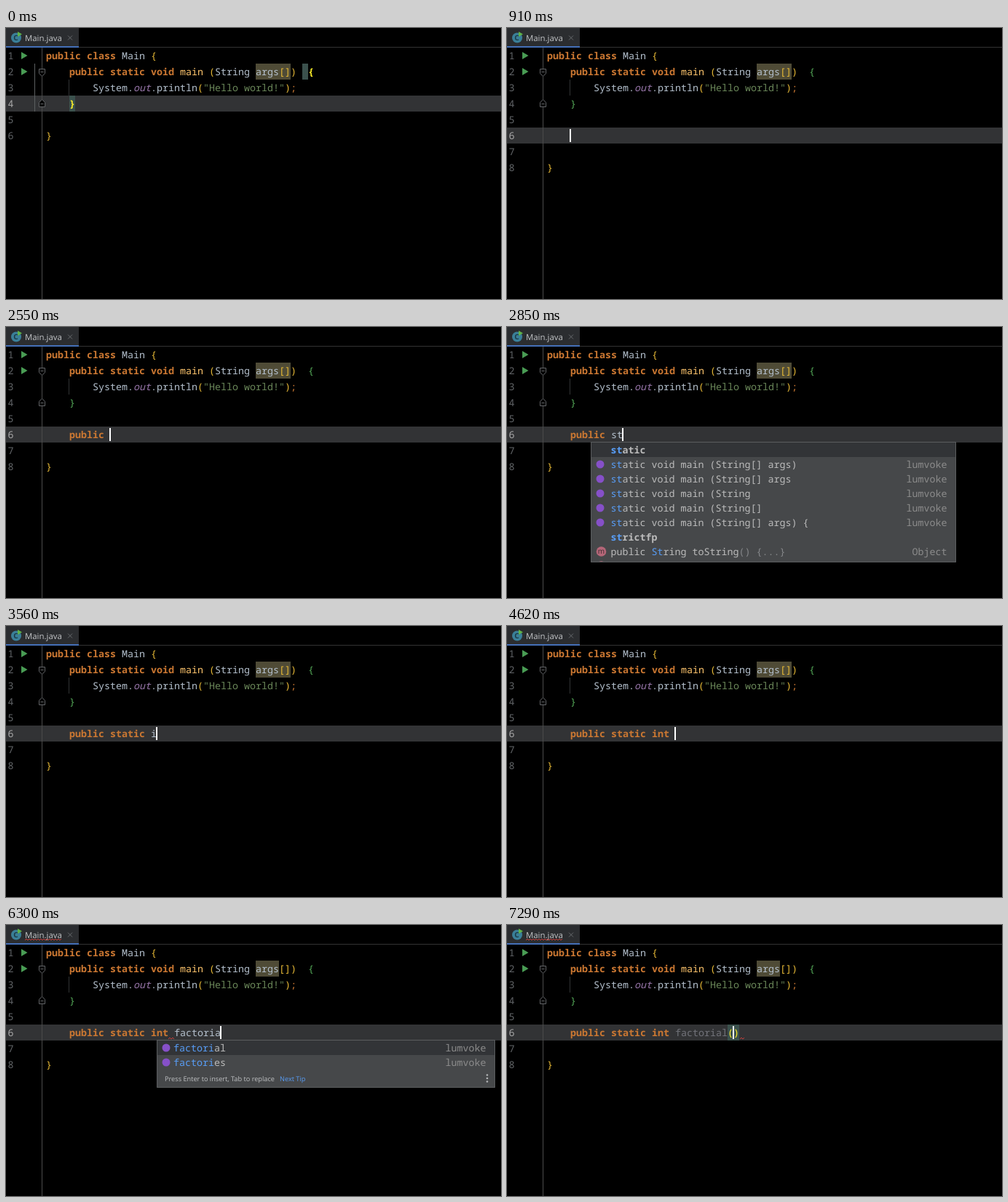
An HTML page that plays this animation: 680x373 px, repeating every 8000 ms.

```html
<!DOCTYPE html>
<html lang="en">
<head>
<meta charset="utf-8">
<title>Typing in a code editor</title>
<style>
html, body { margin: 0; width: 100%; height: 100%; overflow: hidden; background: #000; }
svg { display: block; width: 680px; height: 373px; }
text { white-space: pre; text-rendering: geometricPrecision; font: 13.333px "Noto Sans Mono", "DejaVu Sans Mono", monospace; }
.b { font-weight: 700; }
.i { font-style: italic; }
.ui { font-family: "Open Sans", "Noto Sans", sans-serif; }
.tab { font-size: 11.4px; }
.tip { font-size: 9.2px; }
.mini { font-size: 10px; }
</style>
</head>
<body>
<svg id="stage" viewBox="0 0 680 373"></svg>
<script>
const LOOP = 8000, LEFT = 55, CH = 8, ROW = 22;
const C = {
  key: '#cc7832', id: '#b4c0cd', fn: '#ffc66d', str: '#6a8759', field: '#9876aa',
  gold: '#e8ba36', green: '#54a857', match: '#ffef28', matchBg: '#3b514d',
  line: '#323335', dim: '#72737a', blue: '#589df6', red: '#c8403c'
};
const KEYWORDS = ['public', 'static', 'int'];

// [time, text on the new line]
const KEYS = [
  [910, ''], [1680, 'p'], [1800, 'pu'], [1950, 'pub'], [2090, 'publ'], [2250, 'publi'], [2390, 'public'],
  [2520, 'public '], [2640, 'public s'], [2780, 'public st'], [2920, 'public sta'], [3020, 'public stat'],
  [3130, 'public stati'], [3220, 'public static'], [3360, 'public static '], [3560, 'public static i'],
  [3700, 'public static in'], [3840, 'public static int'], [4620, 'public static int '],
  [5090, 'public static int f'], [5400, 'public static int fa'], [5600, 'public static int fac'],
  [5830, 'public static int fact'], [5940, 'public static int facto'], [6050, 'public static int factor'],
  [6170, 'public static int factori'], [6290, 'public static int factoria'],
  [6400, 'public static int factorial'], [7290, 'public static int factorial()']
];

// Suggestion rows: icon|text|tail|right label ('t' assistant, 'm' method)
const ai = s => `t|${s}||lumvoke`;
const mainAi = (lead, ends) => ends.map(e => ai(lead + 'static void main' + e));
const toStr = 'm|public String toString|() {...}|Object';
const equalsRow = 'm|public boolean equals|(Object obj) {...}|Object';
const hashRow = 'm|public int hashCode|() {...}|Object';
const cloneRow = 'm|protected Object clone|() {...}|Object';
const pubRows = ['|public', ...mainAi('public ', [' (String', '', ' (String[] args)', ' (String[] args', ' (String[] args) {']),
  equalsRow, hashRow, toStr];
const stTail = [' (String[] args)', ' (String[] args', ' (String', ' (String[]', ' (String[] args) {'];
const staticRows = ['|static', ...mainAi('', stTail)];
const stRows = [...staticRows, '|strictfp', toStr, cloneRow];
const intRows = ['|int', '|interface', ai('int main'), ai('int i'), ai('int[] args'), hashRow, 'm|protected void finalize|() {...}|Object'];
const facRows = [ai('factory'), ai('interface')];
const fRows = [...facRows, ai('false'), ai('fast'), ai('face')];
const factRows = ['factory', 'factor', 'factorial', 'factories', 'facts'].map(ai);

// [time, query, rows, left, right, text x, fixed bottom]
const pub = (t, q, rows = pubRows) => [t, q, rows, 59, 525, 86.5];
const stat = (t, q, rows, bottom) => [t, q, rows, 115, 617, 142.5, bottom];
const num = (t, q, rows) => [t, q, rows, 175, 640, 198.5];
const fac = (t, q, rows) => [t, q, rows, 207, 672, 230];
const POPUPS = [
  pub(1740, 'p', [...pubRows, '|private', '|protected']), pub(1850, 'pu'), pub(2000, 'pub'), pub(2130, 'publ'),
  pub(2290, 'publi'), pub(2430, 'public'), [2520],
  stat(2700, 's', [...stRows, '|synchronized', equalsRow]), stat(2820, 'st', stRows, 324),
  stat(2960, 'sta', staticRows), stat(3060, 'stat', staticRows), stat(3170, 'stati', staticRows),
  stat(3260, 'static', staticRows), [3360],
  num(3610, 'i', intRows), num(3740, 'in', intRows), num(3890, 'int', intRows), [4620],
  fac(5200, 'f', fRows), fac(5400, 'fa', fRows), fac(5630, 'fac', facRows),
  fac(5870, 'fact', factRows), fac(5980, 'facto', factRows.slice(0, 4)), fac(6090, 'factor', factRows.slice(0, 4)),
  fac(6210, 'factori', factRows.slice(2, 4)), fac(6330, 'factoria', factRows.slice(2, 3)), [6450]
];

const at = (list, t) => list.filter(e => e[0] <= t).pop();
const esc = s => String(s).replace(/&/g, '&amp;').replace(/</g, '&lt;');
const rowTop = n => 27 + (n - 1) * ROW;
const colX = c => LEFT + c * CH;
const rect = (x, y, w, h, fill) => `<rect x="${x}" y="${y}" width="${w}" height="${h}" fill="${fill}"/>`;
const path = (d, stroke, fill = 'none') => `<path d="${d}" stroke="${stroke}" fill="${fill}"/>`;
const circle = (x, y, r, fill) => `<circle cx="${x}" cy="${y}" r="${r}" fill="${fill}"/>`;
const text = (x, y, s, fill, cls = '', anchor = 'start') =>
  `<text x="${x}" y="${y}" fill="${fill}" class="${cls}" text-anchor="${anchor}">${esc(s)}</text>`;
const code = (row, col, s, fill, cls) => text(colX(col), rowTop(row) + 16, s, fill, cls);
const caret = (row, col) => rect(colX(col) - 1, rowTop(row) + 2, 2, 18, '#fff');

function wave(x1, x2, y) {
  let d = `M${x1} ${y + 2}`;
  for (let x = x1 + 2, up = true; x <= x2; x += 2, up = !up) d += `L${x} ${up ? y : y + 2}`;
  return path(d, C.red);
}

function tabBar(error) {
  return rect(0, 0, 100, 26, '#2b2d30') + rect(100, 26, 580, 1, '#323232') + rect(0, 25, 100, 2, '#4470b8') +
    circle(14, 13.5, 7, '#3a7f98') + text(13.5, 17, 'C', '#1c3a46', 'ui mini b', 'middle') +
    path('M16 5L22 8.5L16 12Z', 'none', '#5fb348') +
    text(26, 18, 'Main.java', '#c4c6c8', 'ui tab') +
    path('M85 10.5l6 6m0 -6l-6 6', '#66696c') + (error ? wave(26, 77, 19) : '');
}

function gutter(count, current, scope) {
  let s = path('M49.5 27V373', '#4b4b4b');
  for (let n = 1; n <= count; n++) s += text(2.5, rowTop(n) + 16, n, n === current ? '#a9a9a9' : '#606366');
  for (const y of [38, 60]) s += path(`M21 ${y - 5}L29.5 ${y}L21 ${y + 5}Z`, 'none', '#499c54');
  if (scope) s += path('M39.5 49V115', '#5c6061');
  return s + path('M45.5 56.5h8v6l-4 4l-4 -4zM47.5 60.5h4', '#626467', '#000') +
    path('M45.5 108.5h8v-6l-4 -4l-4 4zM47.5 104.5h4', '#626467', '#000');
}

function program(t, lastRow) {
  const paired = t < 570;
  let s = rect(343, 49, t < 5090 ? 48 : 32, 22, '#4f4b36') + path('M86.5 71V93', '#303234');
  if (paired) s += rect(407, 49, 8, 22, C.matchBg) + rect(87, 93, 8, 22, C.matchBg);
  const brace = paired ? C.match : C.green, cls = paired ? 'b' : '';
  return s +
    code(1, 0, 'public class', C.key, 'b') + code(1, 13, 'Main', C.id) + code(1, 18, '{', C.gold) +
    code(2, 4, 'public static void', C.key, 'b') + code(2, 23, 'main', C.fn) + code(2, 28, '(', C.gold) +
    code(2, 29, 'String args', C.id) + code(2, 40, '[])', C.gold) + code(2, 45, '{', brace, cls) +
    code(3, 8, 'System.', C.id) + code(3, 15, 'out', C.field, 'i') + code(3, 18, '.println', C.id) +
    code(3, 26, '(', C.gold) + code(3, 27, '"Hello world!"', C.str) + code(3, 41, ')', C.gold) +
    code(3, 42, ';', C.key) + code(4, 4, '}', brace, cls) + code(lastRow, 0, '}', C.gold);
}

function typedLine(t, line) {
  const called = line.endsWith('()');
  let s = called ? rect(303, 137, 16, 22, C.matchBg) : '', col = 4;
  for (const word of line.replace('()', '').split(' ')) {
    const key = KEYWORDS.includes(word);
    s += code(6, col, word, key ? C.key : t >= 6780 ? C.dim : C.id, key ? 'b' : '');
    col += word.length + 1;
  }
  if (called) s += code(6, col - 1, '()', C.match);
  if (t >= 7290) s += wave(320, 326, 155);
  else if (t >= 6780) s += wave(303, 310, 155);
  else if (t >= 4790) s += wave(223, 231, 155);
  return s;
}

function popupRow(row, query, left, right, x, y) {
  const [icon, label, tail = '', source = ''] = row.split('|');
  const cls = icon ? '' : 'b', base = y + 15;
  const from = Math.max(0, label.toLowerCase().indexOf(query));
  const hit = label.toLowerCase().includes(query) ? query.length : 1;
  const cuts = [0, from, from + hit, label.length];
  let s = '';
  if (icon === 't') s += circle(left + 13, y + 10, 5.5, '#8650c8');
  if (icon === 'm') s += circle(left + 14.5, y + 10, 6.8, '#b46678') + text(left + 14.5, y + 13.2, 'm', '#3b2a2f', 'ui mini', 'middle');
  for (let i = 0; i < 3; i++)
    s += text(x + cuts[i] * CH, base, label.slice(cuts[i], cuts[i + 1]), i === 1 ? C.blue : '#bbbbbb', cls);
  return s + text(x + label.length * CH, base, tail, '#85878a') + text(right - 12.5, base, source, '#8c8c8c', '', 'end');
}

function popup([, query, rows, left, right, x, fixed]) {
  const top = 158, bottom = fixed || top + 26 + rows.length * 20;
  let s = `<clipPath id="pop">${rect(left, top, right - left, bottom - top, '#000')}</clipPath><g clip-path="url(#pop)">` +
    rect(left, top, right - left, bottom - top, '#46484a') + rect(left, top + 1, right - left, 20, '#323437');
  rows.forEach((r, i) => s += popupRow(r, query, left, right, x, top + 1 + i * 20));
  if (!fixed) {
    s += text(left + 11, bottom - 9.5, 'Press Enter to insert, Tab to replace', '#bfc1c3', 'ui tip') +
      text(left + 169, bottom - 9.5, 'Next Tip', C.blue, 'ui tip');
    for (const d of [-4.5, 0, 4.5]) s += circle(right - 11, bottom - 13 + d, 1.3, '#b4b6b8');
  }
  return s + `</g>` + path(`M${left + .5} ${top + .5}H${right - .5}V${bottom - .5}H${left + .5}Z`, '#5b5d5f');
}

function draw(t) {
  const current = t < 570 ? 4 : t < 910 ? 5 : 6, lastRow = current + 2;
  const line = t < 910 ? '' : at(KEYS, t)[1];
  const pop = at(POPUPS, t);
  let s = rect(0, 0, 680, 373, '#000') + rect(0, rowTop(current), 680, ROW, C.line) + tabBar(t >= 4790) +
    gutter(lastRow, current, t < 570) + program(t, lastRow) + typedLine(t, line);
  const caretOn = t >= 370 && !(t >= 4420 && t < 4620);
  const col = current === 4 ? 5 : 4 + line.length - (line.endsWith('()') ? 1 : 0);
  if (caretOn) s += caret(current, col);
  return s + (pop && pop[1] ? popup(pop) : '');
}

const stage = document.getElementById('stage');
const start = performance.now();
let shown = '';
function tick() {
  const next = draw((performance.now() - start) % LOOP);
  if (next !== shown) stage.innerHTML = shown = next;
  requestAnimationFrame(tick);
}
tick();
</script>
</body>
</html>
```
